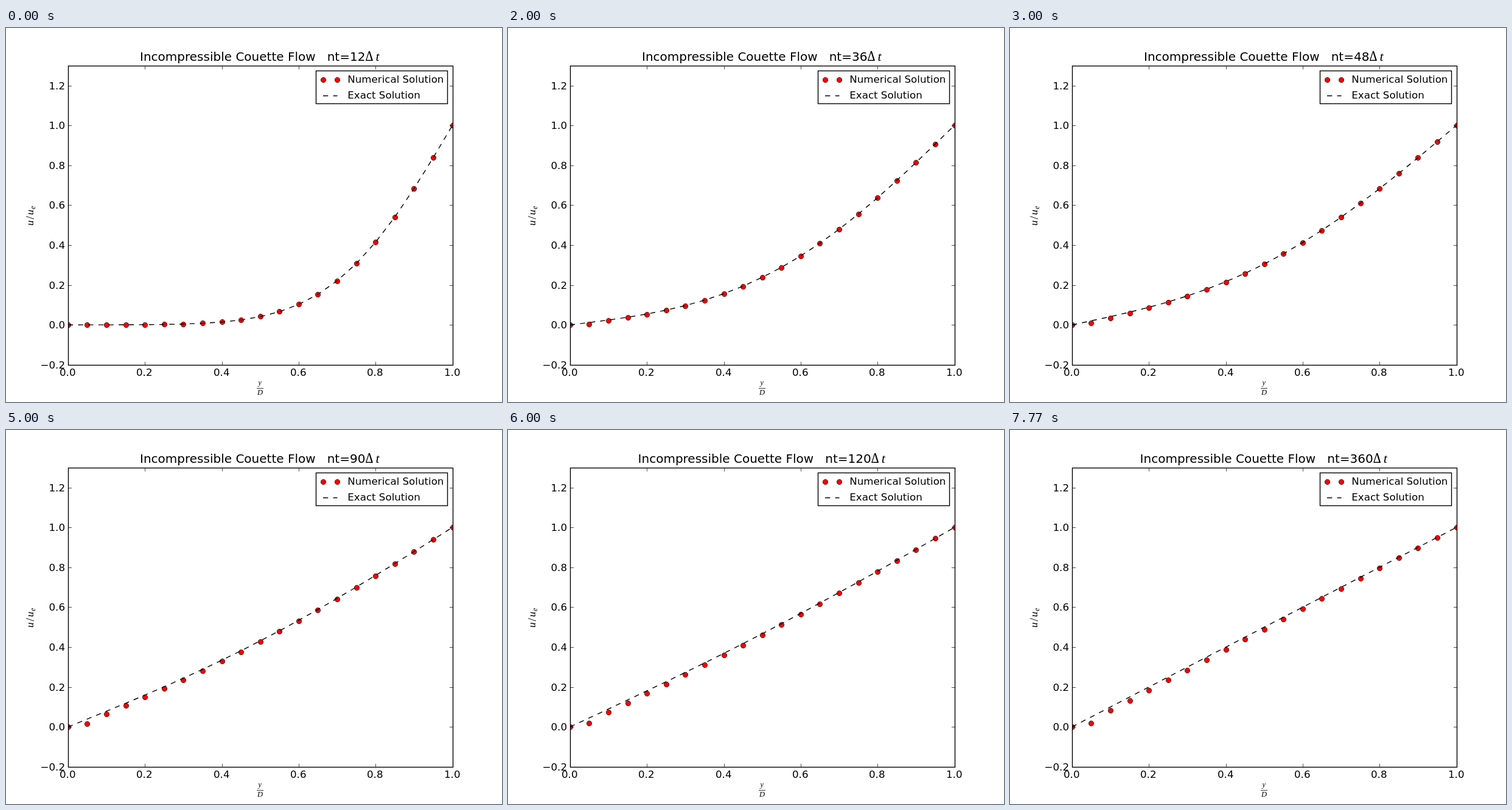
Write an HTML page with a canvas that moves like this. It is 815 px wide and 615 px high and loops after 8.77 s.

```html
<!DOCTYPE html>
<html>
<head>
<meta charset="utf-8">
<style>
html, body { margin: 0; width: 100%; height: 100%; overflow: hidden; background: #fff }
canvas { display: block }
</style>
</head>
<body>
<canvas id="stage" width="815" height="615"></canvas>
<script>
const ctx = document.getElementById('stage').getContext('2d');
const SANS = '"DejaVu Sans", sans-serif';
const MATH = '"Liberation Serif", serif';
const N = 20, DT = 0.0025;              // DT = dy^2, diffusion number 1
const LEFT = 102.5, RIGHT = 734.5, TOP = 62.5, BOTTOM = 554.5;
const STARTS = [0, 1000, 2000, 3000, 4000, 5000, 6000, 6770, 7770];
const STEPS = [12, 24, 36, 48, 60, 90, 120, 240, 360];
const LOOP = 8770;

const px = y => 101.9 + 631.6 * y;
const py = u => 488.2 - 328 * u;

// Crank-Nicolson with Thomas elimination; the first inner node ignores its upper neighbour
function numeric(steps) {
  const u = Array(N + 1).fill(0);
  u[N] = 1;
  for (let s = 0; s < steps; s++) {
    const d = [], k = [];
    for (let j = 1; j < N; j++) {
      d[j] = 2;
      k[j] = (u[j - 1] + u[j + 1]) / 2 + (j === N - 1 ? 0.5 : 0);
      if (j > 1) {
        d[j] -= 0.25 / d[j - 1];
        k[j] += 0.5 * k[j - 1] / d[j - 1];
      }
    }
    u[N - 1] = k[N - 1] / d[N - 1];
    for (let j = N - 2; j > 1; j--) u[j] = (k[j] + 0.5 * u[j + 1]) / d[j];
    u[1] = k[1] / d[1];
  }
  return u;
}

function exact(y, time) {
  let u = y;
  for (let n = 1; n < 40; n++) {
    const w = n * Math.PI;
    u += 2 / w * (n % 2 ? -1 : 1) * Math.exp(-w * w * time) * Math.sin(w * y);
  }
  return u;
}

const scenes = STEPS.map(steps => ({
  steps,
  dots: numeric(steps),
  curve: Array.from({ length: N + 1 }, (_, j) => exact(j / N, steps * DT))
}));

function text(str, x, y, size, family = SANS, style = '') {
  ctx.font = `${style} ${size}px ${family}`;
  ctx.fillText(str, x, y);
}

function line(points, width, dash = []) {
  ctx.lineWidth = width;
  ctx.setLineDash(dash);
  ctx.beginPath();
  points.forEach(p => ctx.lineTo(...p));
  ctx.stroke();
  ctx.setLineDash([]);
}

function dot(x, y) {
  ctx.beginPath();
  ctx.arc(Math.round(x) + 0.5, Math.round(y) + 0.5, 4.17, 0, 7);
  ctx.fillStyle = '#f00';
  ctx.fill();
  ctx.lineWidth = 0.7;
  ctx.stroke();
  ctx.fillStyle = '#000';
}

const snap = v => Math.round(v) + 0.5;

function axes() {
  for (let i = 0; i <= 5; i++) {
    const x = snap(px(i / 5));
    line([[x, BOTTOM], [x, BOTTOM - 5.6]], 0.7);
    line([[x, TOP], [x, TOP + 5.6]], 0.7);
    text((i / 5).toFixed(1), Math.floor(px(i / 5) - 13.3), 572, 16.67);
  }
  for (let i = -1; i <= 6; i++) {
    const y = snap(py(i / 5));
    line([[LEFT, y], [LEFT + 5.6, y]], 0.7);
    line([[RIGHT, y], [RIGHT - 5.6, y]], 0.7);
    ctx.textAlign = 'right';
    text((i / 5).toFixed(1).replace('-', '\u2212'), 97, Math.round(py(i / 5)) + 6, 16.67);
    ctx.textAlign = 'left';
  }
  ctx.lineWidth = 1.39;
  ctx.strokeRect(LEFT, TOP, RIGHT - LEFT, BOTTOM - TOP);
}

function labels() {
  ctx.save();
  ctx.translate(45, 325);
  ctx.rotate(-Math.PI / 2);
  text('u', 0, 0, 17.5, MATH, 'italic');
  text('/', 10.5, 1, 19, MATH);
  text('u', 17.5, 0, 17.5, MATH, 'italic');
  text('e', 27, 3, 12, MATH, 'italic');
  ctx.restore();
  text('y', 414.5, 587, 12, MATH, 'italic');
  line([[412, 592.5], [423, 592.5]], 0.8);
  text('D', 413, 603, 12.5, MATH, 'italic');
}

function legend() {
  ctx.fillStyle = '#fff';
  ctx.fillRect(509.5, 70.5, 216, 54);
  ctx.fillStyle = '#000';
  ctx.lineWidth = 1.39;
  ctx.strokeRect(509.5, 70.5, 216, 54);
  dot(521, 85);
  dot(544, 85);
  line([[521, 111.5], [544.5, 111.5]], 1.39, [8.33, 8.33]);
  text('Numerical Solution', 561.3, 90, 16.67);
  text('Exact Solution', 561.3, 116, 16.67);
}

function title(steps) {
  const x = steps < 100 ? 220 : 213.6;
  const end = x + 308 + 20 * (1.864 + 0.636 * (String(steps).length - 2)) + 25.6;
  text('Incompressible Couette Flow\u00a0\u00a0\u00a0nt=' + steps, x, 54, 20);
  text('\u0394', end - 0.5, 54, 21, '"Noto Serif", serif');
  text('t', end + 16.6, 54, 22, MATH, 'italic');
}

function draw({ steps, dots, curve }) {
  ctx.fillStyle = '#fff';
  ctx.fillRect(0, 0, 815, 615);
  ctx.fillStyle = ctx.strokeStyle = '#000';
  ctx.save();
  ctx.beginPath();
  ctx.rect(102, 62, 632, 492);
  ctx.clip();
  dots.forEach((u, j) => dot(px(j / N), py(u)));
  line(curve.map((u, j) => [px(j / N), py(u)]), 1.39, [8.33, 8.33]);
  ctx.restore();
  axes();
  labels();
  legend();
  title(steps);
}

const origin = performance.now();
function tick() {
  const t = (performance.now() - origin) % LOOP;
  draw(scenes[STARTS.filter(s => s <= t).length - 1]);
  requestAnimationFrame(tick);
}
tick();
</script>
</body>
</html>
```
